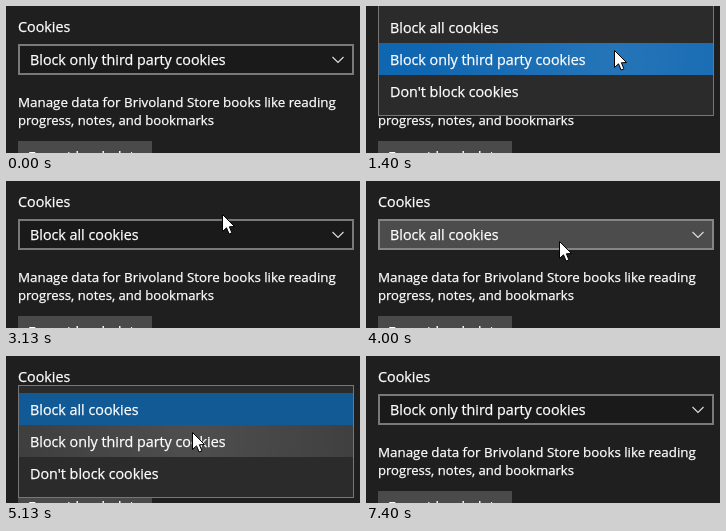
Recreate the animation shown at these times as an HTML page with a canvas. Size 354x147 px, loop 8.07 s.

```html
<!DOCTYPE html>
<html lang="en">
<head>
<meta charset="utf-8">
<title>Cookie settings</title>
<style>
  html, body { margin: 0; width: 100%; height: 100%; overflow: hidden; background: #1f1f1f; }
  canvas { display: block; }
</style>
</head>
<body>
<canvas id="stage" width="354" height="147"></canvas>
<script>
const ctx = document.getElementById('stage').getContext('2d');
const LOOP = 8070;
const OPTIONS = ['Block all cookies', 'Block only third party cookies', "Don't block cookies"];
const BOX = { x: 12, y: 38, w: 336, h: 31 };
const BUTTON = { x: 12, y: 135, w: 134, h: 32 };
const ROW = 32;
const ROW_TOP = 37;

// Pointer moves in ticks of 1/15 s: start, end, from, to
const MOVES = [
  [5, 11, [364, 148], [249, 45]],
  [24, 30, [249, 45], [217, 34]],
  [51, 55, [217, 34], [194, 61]],
  [75, 77, [194, 61], [187, 77]],
  [77, 79, [187, 77], [183, 81]],
  [94, 107, [183, 81], [88, 130]],
  [107, 111, [88, 130], [84, 152]]
];

// Menu openings: press, open, settled, choose, close, selected row
const MENUS = [
  { press: 16, open: 19, settled: 21, choose: 43, close: 47, selected: 1 },
  { press: 60, open: 63, settled: 69, choose: 84, close: 87, selected: 0 }
];

function pointerAt(tick) {
  if (tick < 6 || tick >= 111) return null;
  const [start, end, from, to] = MOVES.filter(m => m[0] < tick).pop();
  const p = Math.min(1, (tick - start) / (end - start));
  const eased = start >= 94 ? p : 1 - (1 - p) ** 1.6;
  return from.map((v, i) => Math.round(v + (to[i] - v) * eased));
}

function rect(x, y, w, h, color) {
  ctx.fillStyle = color;
  ctx.fillRect(x, y, w, h);
}

function frame(x, y, w, h, color, width) {
  ctx.strokeStyle = color;
  ctx.lineWidth = width;
  ctx.strokeRect(x + width / 2, y + width / 2, w - width, h - width);
}

// A hairline outline gives the type a slightly heavier weight
function text(str, x, y, size = 14.3) {
  ctx.font = size + 'px "Open Sans", "Noto Sans", sans-serif';
  ctx.fillStyle = ctx.strokeStyle = '#fff';
  ctx.lineWidth = 0.25;
  ctx.fillText(str, x, y);
  ctx.strokeText(str, x, y);
}

function path(points, close) {
  ctx.beginPath();
  points.forEach(([x, y]) => ctx.lineTo(x, y));
  if (close) ctx.closePath();
}

function drawPage(value, pointer, pressed) {
  rect(0, 0, 354, 147, '#1f1f1f');
  text('Cookies', 12, 26);

  const { x, y, w, h } = BOX;
  const hover = pointer && pointer[1] >= y && pointer[1] < y + h;
  rect(x, y, w, h, pressed ? '#4c4c4c' : '#1a1a1a');
  frame(x, y, w, h, pressed ? '#858585' : hover ? '#a6a6a6' : '#797979', 2);
  text(value, 24, 59);
  path([[326.5, 51], [332, 56.5], [337.5, 51]]);
  ctx.strokeStyle = '#e0e0e0';
  ctx.lineWidth = 1.1;
  ctx.stroke();

  text('Manage data for Brivoland Store books like reading', 12, 101, 13.35);
  text('progress, notes, and bookmarks', 12, 119, 13.1);

  const b = BUTTON;
  rect(b.x, b.y, b.w, b.h, '#4a4a4a');
  if (pointer && pointer[1] >= b.y) frame(b.x, b.y, b.w, b.h, '#858585', 2);
  text('Export book data', 22, 156);
}

function drawMenu(menu, pointer, tick) {
  const top = ROW_TOP - menu.selected * ROW;
  const progress = (tick - menu.open) / (menu.settled - menu.open);
  ctx.globalAlpha = Math.min(1, 0.8 + 0.2 * progress);
  rect(12, top - 8, 336, 113, '#2b2b2b');
  frame(12, top - 8, 336, 113, '#767676', 1);

  OPTIONS.forEach((label, i) => {
    const y = top + i * ROW;
    const selected = i === menu.selected;
    const hover = pointer[1] >= y && pointer[1] < y + ROW;
    if (selected) rect(13, y, 334, ROW, hover ? '#1067b1' : '#125a96');
    else if (hover) rect(13, y, 334, ROW, tick >= menu.choose ? '#555' : '#3d3d3d');
    if (hover) {
      const glow = ctx.createRadialGradient(pointer[0], y + 16, 0, pointer[0], y + 16, 190);
      glow.addColorStop(0, 'rgba(255,255,255,.09)');
      glow.addColorStop(1, 'rgba(255,255,255,0)');
      rect(13, y, 334, ROW, glow);
    }
    text(label, 24, y + 22);
  });
  ctx.globalAlpha = 1;
}

function drawPointer([x, y]) {
  ctx.save();
  ctx.translate(x - 0.5, y - 0.5);
  path([[0, 0], [0, 17], [4, 13.3], [6.6, 19.5], [9.4, 18.3], [6.9, 12.3], [12, 12]], true);
  ctx.fillStyle = '#fff';
  ctx.fill();
  ctx.strokeStyle = '#000';
  ctx.lineWidth = 1;
  ctx.stroke();
  ctx.restore();
}

function draw() {
  const tick = Math.floor((performance.now() % LOOP) * 0.015 + 0.06);
  const pointer = pointerAt(tick);
  const menu = MENUS.find(m => tick >= m.press && tick < m.close);
  const value = OPTIONS[tick >= MENUS[0].close && tick < MENUS[1].close ? 0 : 1];
  drawPage(value, pointer, !!menu);
  if (menu && tick >= menu.open) drawMenu(menu, pointer, tick);
  if (pointer) drawPointer(pointer);
  requestAnimationFrame(draw);
}
draw();
</script>
</body>
</html>
```
